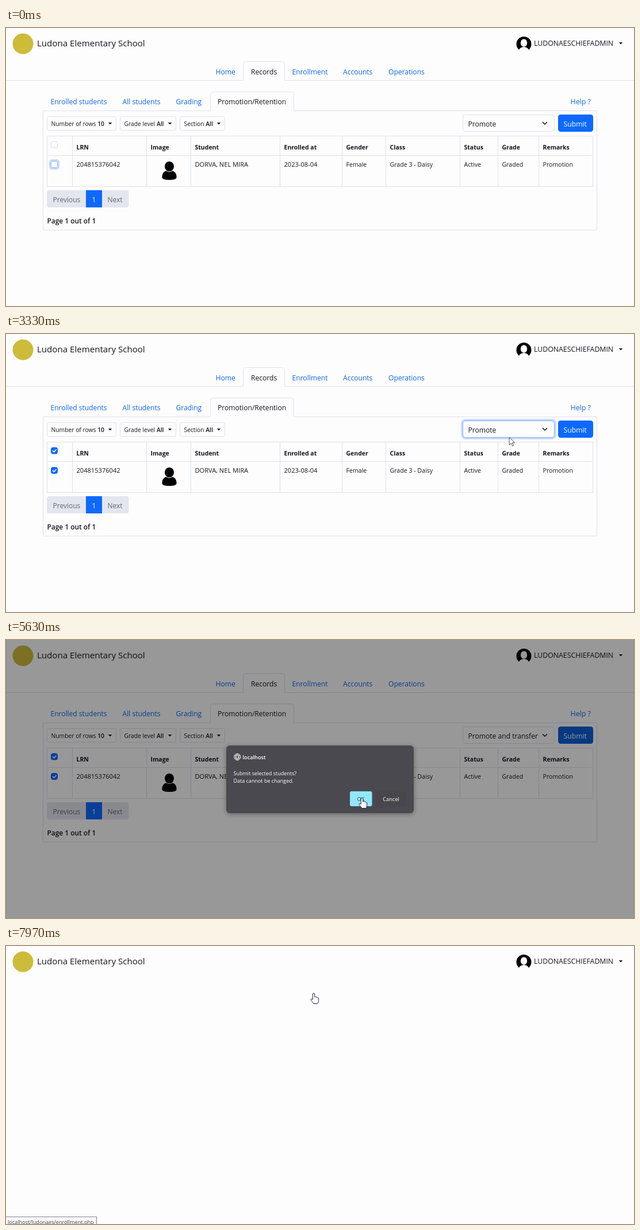
An HTML page that plays this animation: 1092 px wide and 485 px high, repeating every 8000 ms.

```html
<!DOCTYPE html>
<html lang="en">
<head>
<meta charset="utf-8">
<title>Student promotion</title>
<style>
  html, body { margin: 0; width: 100%; height: 100%; overflow: hidden; background: #fdfdfe; }
  svg { display: block; width: 100%; height: 100%; }
  text { font-family: "Open Sans", "Noto Sans", sans-serif; white-space: pre; }
  .raised { filter: drop-shadow(0 2px 4px rgba(0, 0, 0, .35)); }
</style>
</head>
<body>
<svg id="stage" viewBox="0 0 1092 485"></svg>
<script>
const INK = '#14161f', LINK = '#0d66ea', BLUE = '#0d69fd', PRESSED = '#0b5ed7';
const LINE = '#dfe1ea', PAGE = '#fdfdfe', ALERT = '#cde5de';
const LOOP = 8000;

const text = (x, y, label, size = 12.1, fill = INK, extra = '') =>
  `<text x="${x}" y="${y}" font-size="${size}" fill="${fill}" ${extra}>${label}</text>`;
const rect = (x, y, w, h, fill, stroke = 'none', r = 0, extra = '') =>
  `<rect x="${x}" y="${y}" width="${w}" height="${h}" rx="${r}" fill="${fill}" stroke="${stroke}" ${extra}/>`;
const path = (d, stroke = LINE, fill = 'none', extra = '') =>
  `<path d="${d}" stroke="${stroke}" fill="${fill}" ${extra}/>`;
const group = (id, body) => `<g id="${id}">${body}</g>`;
const caret = (x, y) => path(`M${x - 3.2} ${y}h6.4l-3.2 3.4z`, 'none', INK);
const bold = 'font-weight="700"';
const round = 'stroke-linecap="round" stroke-linejoin="round"';

// Rounded tab that is open at its base line
const tab = (x1, x2, top, base) =>
  path(`M${x1} ${base}V${top + 5}q0 -5 5 -5H${x2 - 5}q5 0 5 5V${base}`);

function dropdown(x, w, label, value) {
  return rect(x + .5, 154.5, w, 24, PAGE, LINE, 3) +
    text(x + 7.5, 170.5, `${label} <tspan font-weight="600">${value}</tspan>`, 10.3) +
    caret(x + w - 10, 165);
}

function checkbox(id, y) {
  const x = 78.5, top = y - 5.5;
  return rect(x - 2, top - 2, 15, 15, 'none', '#c3d9ff', 4, `id="${id}Ring" stroke-width="3"`) +
    rect(x, top, 11, 11, '#fff', '#c8c8e4', 3, `id="${id}Box"`) +
    path(`M${x + 2.8} ${y + .2}l2.2 2.2 3.6-4.2`, '#fff', 'none', `id="${id}Tick" stroke-width="1.5" ${round}`);
}

function header() {
  return '<circle cx="29.5" cy="27.5" r="18" fill="#cdbb3a"/>' +
    text(54, 32, 'Ludona Elementary School', 15.1) +
    '<clipPath id="face"><rect x="885" y="12" width="30" height="27"/></clipPath>' +
    '<g clip-path="url(#face)"><circle cx="900.5" cy="28" r="13" fill="#000"/>' +
    `<ellipse cx="900.5" cy="26" rx="5.7" ry="6.7" fill="${PAGE}"/>` +
    `<ellipse cx="900.5" cy="40.5" rx="9" ry="7.5" fill="${PAGE}"/></g>` +
    text(918, 31, 'LUDONAESCHIEFADMIN', 12.3) + caret(1069, 25);
}

function nav() {
  return path('M0 91.5H412.5M484.5 91.5H1092') + tab(412.5, 484.5, 58.5, 91.5) +
    group('navHover', tab(484.5, 572.5, 58.5, 91.5)) +
    text(364.5, 80.5, 'Home', 12.1, LINK) + text(426, 80.5, 'Records') +
    text(497.5, 80.5, 'Enrollment', 12.1, LINK) + text(586, 80.5, 'Accounts', 12.1, LINK) +
    text(665, 80.5, 'Operations', 12.1, LINK);
}

function toolbar() {
  return tab(355.5, 500.5, 111.5, 144.5) +
    text(77.5, 133, 'Enrolled students', 12, LINK) + text(202.5, 133, 'All students', 12.1, LINK) +
    text(295.5, 133, 'Grading', 12.1, LINK) + text(368, 133, 'Promotion/Retention') +
    text(981.5, 132.5, 'Help ?', 12.4, LINK) +
    dropdown(71, 120, 'Number of rows', '10') + dropdown(198, 97, 'Grade level', 'All') +
    dropdown(302, 78, 'Section', 'All') +
    rect(793, 150, 162, 32, 'none', '#c3d9ff', 6, 'id="selectRing" stroke-width="3.5"') +
    rect(794.5, 151.5, 159, 29, PAGE, LINE, 4, 'id="selectBox"') +
    text(803.5, 171.5, 'Promote', 12.1, INK, 'id="choice"') +
    path('M933.5 164.5l3.5 3.5 3.5-3.5', INK, 'none', `stroke-width="1.5" ${round}`) +
    rect(960, 151, 61, 30, BLUE, 'none', 4.5, 'id="submit"') + text(969.5, 171.5, 'Submit', 12.2, '#fff');
}

const columns = [
  [115.5, 'LRN', '204815376042', 11.1], [244.5, 'Image', ''],
  [321.5, 'Student', 'DORVA, NEL MIRA', 11.1], [476.5, 'Enrolled at', '2023-08-04', 11.1],
  [584.5, 'Gender', 'Female'], [660.5, 'Class', 'Grade 3 - Daisy'], [789.5, 'Status', 'Active'],
  [855.5, 'Grade', 'Graded'], [926.5, 'Remarks', 'Promotion']
];

function table() {
  const cells = columns.map(([x, title, value, size = 10.6]) =>
    path(`M${x} 188.5V276.5`) + text(x + 7, 211.5, title, 10.5, INK, bold) +
    text(x + 7, 242, value, size)).join('');
  return path('M64.5 144.5H355.5M500.5 144.5H1027.5V352.5H64.5V144.5') +
    rect(71.5, 188.5, 949, 88, 'none', LINE) + path('M71.5 222.5H1020.5') + cells +
    checkbox('all', 203.5) + checkbox('row', 238) +
    '<ellipse cx="284" cy="241.5" rx="8" ry="8.7" fill="#000"/>' +
    path('M271.5 261C271 254 275 249.5 279 249.5Q284 253 289 249.5C293 249.5 297 254 296.5 261Q296 265 284 265T271.5 261Z', 'none', '#000') +
    rect(71, 283, 142.5, 30, '#e4e6ee', 'none', 4) + rect(139, 283, 28, 30, BLUE) +
    text(81.5, 303.5, 'Previous', 12, '#626773') + text(149.5, 303.5, '1', 12, '#fff') +
    text(176.5, 303.5, 'Next', 12, '#626773') +
    text(71.5, 341, 'Page 1 out of 1', 11.9, INK, 'font-weight="600"');
}

function emptyPanel() {
  return path('M64.5 144.5H355.5M500.5 144.5H1027.5V233.5H64.5V144.5') +
    text(78, 202.5, 'No students cannot be promoted or retained.');
}

function alertBar() {
  return rect(.5, 92.5, 1091, 45, ALERT, '#acd0c8', 4) +
    '<circle cx="20" cy="115" r="6.3" fill="#0a1a2a"/>' +
    path('M17 115.2l2.3 2.3 3.8-4.6', ALERT, 'none', `stroke-width="1.5" ${round}`) +
    text(32.5, 120.5, 'Promoted selected students.') +
    text(196.5, 120.5, 'View summary', 12.1, LINK, 'text-decoration="underline"') +
    path('M1066 109l12 12M1078 109l-12 12', '#4d5b5c', 'none', 'stroke-width="1.7" stroke-linecap="round"');
}

function dialog() {
  return rect(0, 0, 1092, 485, '#000', 'none', 0, 'opacity=".4"') +
    rect(383, 184, 326, 118, '#4a4950', 'none', 6, 'class="raised"') +
    path('M396.7 204a5.5 5.5 0 1 0 11 0a5.5 5.5 0 1 0-11 0M397.3 202h9.8M397.3 206h9.8M402.2 198.5q-5 5.5 0 11q5-5.5 0-11', '#fff') +
    text(411.5, 207.5, 'localhost', 9.2, '#fff', 'font-weight="600"') +
    text(395.5, 235.5, 'Submit selected students?', 9, '#fff') +
    text(395.5, 248.5, 'Data cannot be changed.', 9, '#fff') +
    rect(598, 264, 38.5, 26, '#92e8fb', 'none', 3) +
    text(617, 280.5, 'OK', 9.2, '#24404c', 'text-anchor="middle"') +
    rect(643, 264, 53, 26, '#48464a', 'none', 3) +
    text(669.5, 280.5, 'Cancel', 9.2, '#fff', 'text-anchor="middle"');
}

function statusBar() {
  return rect(-.5, 472.5, 158, 15, '#f8f8fb', '#85858f') +
    text(3, 485, 'localhost/ludonaes/enrollment.php', 9.1, '#46464e');
}

function pointers() {
  return path('M0 0V13.5L3.2 10.6L5.4 15.3L7.4 14.4L5.3 9.8H9.5Z', '#3c3c50', '#fff', 'id="arrow" stroke-width=".9"') +
    path('M-1.7 10.5V1Q-1.6-.5 0-.5T1.7 1V6Q3.4 4.9 4.5 6.3Q6 5.5 6.8 7Q8.6 6.6 8.6 8.7V12.5Q8.4 15.5 6.7 17.5H-.2Q-2.3 14.5-4.8 11.2Q-5.4 9.7-4 9.2Q-2.8 9.1-1.7 10.5Z', '#22223a', '#fff', 'id="hand"');
}

const stage = document.getElementById('stage');
stage.innerHTML = rect(0, 0, 1092, 485, PAGE) + header() + group('nav', nav()) +
  group('alertBar', alertBar()) +
  group('content', toolbar() + group('table', table()) + group('empty', emptyPanel())) +
  group('dialog', dialog()) + group('status', statusBar()) + group('pointer', pointers());

const el = {};
stage.querySelectorAll('[id]').forEach(node => el[node.id] = node);
const show = (id, on) => el[id].setAttribute('display', on ? 'inline' : 'none');
const set = (id, name, value) => el[id].setAttribute(name, value);

// Pointer stops: time, x, y
const stops = [
  [900, -12, 300], [1230, 51, 251], [1300, 51, 251], [1600, 84, 204], [1830, 84, 204],
  [2300, 736, 173], [2380, 736, 173], [2700, 880, 167], [3200, 880, 167], [3500, 868, 199],
  [3850, 868, 199], [4290, 1021, 162], [4360, 1021, 162], [4560, 1000, 168], [4900, 1000, 168],
  [5450, 619, 276], [5950, 619, 276], [6500, 535, 83], [LOOP, 535, 83]
];

function pointerAt(t) {
  const i = stops.findIndex(stop => stop[0] > t);
  if (i < 1) return stops[0].slice(1);
  const [t0, x0, y0] = stops[i - 1], [t1, x1, y1] = stops[i];
  const p = (t - t0) / (t1 - t0), k = p * p * (3 - 2 * p);
  return [x0 + (x1 - x0) * k, y0 + (y1 - y0) * k];
}

function setCheckbox(id, checked, focused) {
  show(id + 'Ring', focused);
  show(id + 'Tick', checked);
  set(id + 'Box', 'fill', checked ? BLUE : '#fff');
  set(id + 'Box', 'stroke', checked ? BLUE : focused ? '#86b0fe' : '#d4d4ee');
}

function render(t) {
  const within = (from, to) => t >= from && t < to;
  const checked = t >= 1750, submitted = t >= 5900, leaving = t >= 7450;
  const selectFocus = within(2780, 4800);

  setCheckbox('all', checked, within(1750, 2780));
  setCheckbox('row', checked, !checked);
  show('selectRing', selectFocus);
  set('selectBox', 'stroke', selectFocus ? '#86b0fe' : LINE);
  set('submit', 'fill', within(4480, 5900) ? PRESSED : BLUE);
  el.choice.textContent = within(3750, 5900) ? 'Promote and transfer' : 'Promote';

  show('dialog', within(4800, 5800));
  show('nav', !leaving);
  show('navHover', within(6430, 7450));
  show('content', !leaving);
  set('content', 'transform', `translate(0 ${submitted ? 46 : 0})`);
  show('alertBar', submitted && !leaving);
  show('table', !submitted);
  show('empty', submitted);
  show('status', t >= 6750);

  const hand = within(4480, 5900) || t >= 6430;
  show('arrow', !hand);
  show('hand', hand);
  show('pointer', t >= 900);
  set('pointer', 'transform', `translate(${pointerAt(t).join(' ')})`);
}

const start = performance.now();
function tick() {
  render((performance.now() - start) % LOOP);
  requestAnimationFrame(tick);
}
tick();
</script>
</body>
</html>
```
